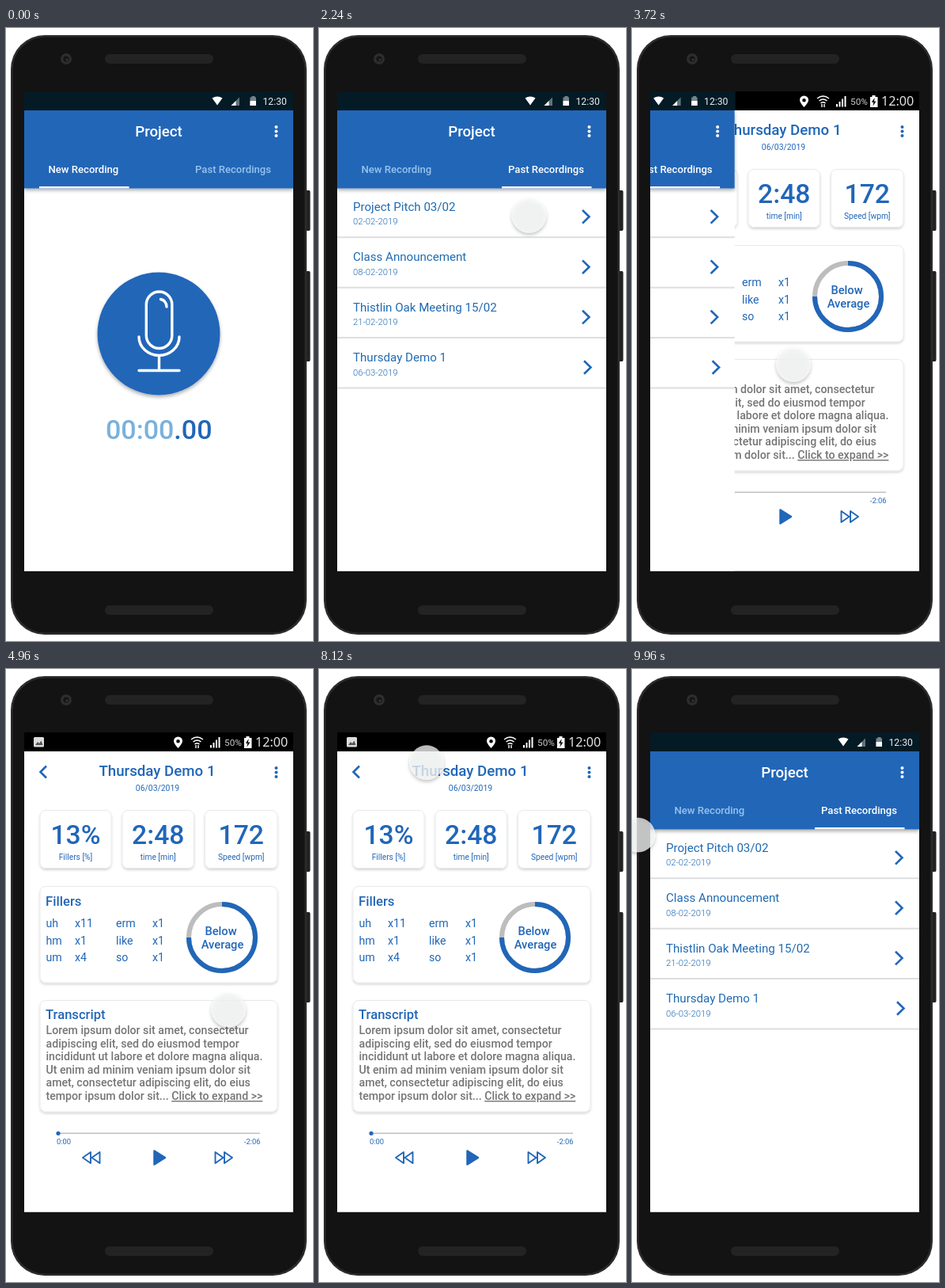
Write an HTML page that moves like this. It is 388 by 774 pixels and loops after 10 s.

```html
<!DOCTYPE html>
<html lang="en">
<head>
<meta charset="utf-8">
<title>Recorder prototype</title>
<style>
  html, body { margin: 0; width: 100%; height: 100%; overflow: hidden; background: #fff; }
  svg { display: block; width: 100%; height: 100%; font-family: Roboto, sans-serif; }
  .blue { fill: #2166b8; }
  .line { fill: none; stroke: #2166b8; stroke-width: 2.6; }
  .mic { fill: none; stroke: #fff; stroke-width: 3.4; stroke-linecap: round; }
  .med { font-weight: 500; }
  .mid { text-anchor: middle; }
  .end { text-anchor: end; }
  .card { fill: #fff; stroke: #e6eaed; filter: url(#soft); }
</style>
</head>
<body>
<svg viewBox="0 0 388 774">
  <defs>
    <clipPath id="glass"><rect x="23" y="80" width="340" height="605.5"/></clipPath>
    <filter id="soft" x="-10%" y="-10%" width="120%" height="130%">
      <feDropShadow dx="0" dy="2" stdDeviation="1.8" flood-opacity=".16"/>
    </filter>
    <filter id="deep" x="-20%" y="-20%" width="140%" height="150%">
      <feDropShadow dx="0" dy="2.5" stdDeviation="2" flood-opacity=".32"/>
    </filter>
  </defs>

  <g id="phone">
    <path d="M378 205h5q1.500 0 1.500 2v47q0 2 -1.500 2h-5zM378 307h5q1.500 0 1.500 2v110q0 2 -1.500 2h-5z" fill="#222"/>
    <rect x="6" y="9" width="374" height="757" rx="43" fill="#2c2c2c"/>
    <rect x="8.500" y="11.500" width="369" height="752" rx="41" fill="#131313"/>
    <circle cx="76" cy="39" r="7" fill="#2d2d2d"/>
    <circle cx="76" cy="39" r="3.600" fill="#161616"/>
    <circle cx="77" cy="40" r="1.300" fill="#3a3a3a"/>
    <rect x="125" y="33" width="137" height="12" rx="6" fill="#232323"/>
    <rect x="125" y="729" width="137" height="12" rx="6" fill="#232323"/>
    <rect x="23" y="80" width="340" height="605.500" fill="#fff"/>
  </g>

  <g id="screen" clip-path="url(#glass)">
    <g id="home">
      <rect x="23" y="80" width="340" height="606" fill="#fff"/>
      <g id="recorder">
        <circle class="blue" cx="193" cy="386" r="77.500" filter="url(#deep)"/>
        <g class="mic">
          <rect x="177.300" y="333" width="32.500" height="71.500" rx="16.200"/>
          <path d="M195.500 342.500q7 1.500 7.500 9.500M168 390a25.500 23.500 0 0 0 51 0M193.500 414v18M168 432.500h51"/>
        </g>
        <text class="med" x="126" y="519" font-size="34" fill="#7ab1dc">00:00<tspan class="blue">.00</tspan></text>
      </g>
      <g id="list"></g>
      <rect x="23" y="104" width="340" height="98.500" class="blue" filter="url(#deep)"/>
      <rect x="22" y="80" width="342" height="24" fill="#041a25"/>
      <path d="M260.500 88.500q6.500-4 13 0l-6.500 9z" fill="#fff"/>
      <path d="M284.500 98h10.500v-10.500z" fill="#61727b"/>
      <path d="M284.500 98h6v-6z" fill="#fff"/>
      <path d="M310.500 86h4v1.500h1.500v10.500h-7.500v-10.500h2z" fill="#75838a"/>
      <path d="M308.500 92h7.500v6h-7.500z" fill="#fff"/>
      <text x="324.500" y="97" font-size="12.200" fill="#e8edef">12:30</text>
      <text class="med mid" x="193" y="136.500" font-size="18.700" fill="#fff">Project</text>
      <g fill="#fff"><circle cx="341.500" cy="125" r="2"/><circle cx="341.500" cy="130.500" r="2"/><circle cx="341.500" cy="136" r="2"/></g>
      <text id="tabNew" class="med" x="53.500" y="183" font-size="13.100">New Recording</text>
      <text id="tabPast" class="med" x="239" y="183" font-size="13.100">Past Recordings</text>
      <rect id="marker" x="42" y="200" width="113.500" height="2.500" fill="#fff"/>
    </g>

    <g id="detail">
      <rect x="23" y="80" width="340" height="606" fill="#fff"/>
      <rect x="22" y="80" width="342" height="24"/>
      <g fill="#fff">
        <rect x="35" y="86" width="13" height="12.500" rx="1.500" fill="#ddd"/>
        <path d="M37 96l3-4 2 2 2.500-3.500 2 5.500z" fill="#555"/>
        <path fill-rule="evenodd" d="M217.500 100q-5.500-6-5.500-9a5.500 5.500 0 0 1 11 0q0 3-5.500 9zM217.500 93.500a2.300 2.300 0 1 0 0-4.600 2.300 2.300 0 0 0 0 4.600z"/>
        <path d="M234 89q7.500-6 15 0M236.500 92q5-4 10 0M238.500 95q3-2.500 6 0M240 96v4M243 96v4" fill="none" stroke="#fff" stroke-width="1.400"/>
        <path d="M258 96h2v3.500h-2zM261.500 93h2v6.500h-2zM265 89.500h2v10h-2zM268.500 86h2v13.500h-2z"/>
        <path d="M303.500 85h4v2h3v13h-9.500v-13h2.500z"/>
        <path d="M306.800 88l-4 5.800h2.500l-.8 4.700 4-6h-2.600z" fill="#000"/>
        <text x="276" y="97" font-size="11.800" fill="#c8c8c8">50%</text>
        <text x="315" y="98" font-size="16.200" fill="#e2e2e2" style="font-family:'Noto Sans',sans-serif">12:00</text>
      </g>
      <path class="line" d="M51 122.500l-7.500 7.500 7.500 7.500"/>
      <g class="blue">
        <circle cx="341.500" cy="125" r="2"/><circle cx="341.500" cy="130.500" r="2"/><circle cx="341.500" cy="136" r="2"/>
        <text class="med mid" x="191" y="135" font-size="18.700">Thursday Demo 1</text>
        <text class="mid" x="191.500" y="154" font-size="10.400">06/03/2019</text>
      </g>
      <g id="stats"></g>
      <rect class="card" x="43" y="274.500" width="300" height="121.500" rx="7"/>
      <g id="fillers" class="blue">
        <text class="med" x="50" y="298.500" font-size="16.700">Fillers</text>
      </g>
      <circle cx="273" cy="339" r="42" fill="none" stroke="#bdbdbd" stroke-width="6"/>
      <path class="line" d="M273 297a42 42 0 1 1-42 42" style="stroke-width:6"/>
      <g class="blue med mid" font-size="14.700">
        <text x="271.500" y="336">Below</text><text x="273.500" y="353">Average</text>
      </g>
      <rect class="card" x="43" y="418.500" width="300" height="140.500" rx="7"/>
      <text class="blue med" x="50" y="442" font-size="16.600">Transcript</text>
      <g id="script" class="med" font-size="14.130" fill="#757575"></g>
      <path d="M64 586.300h257" stroke="#bcc0c4" stroke-width="1.400"/>
      <g class="blue">
        <circle cx="66" cy="586.300" r="2.600"/>
        <text x="64" y="600" font-size="9.400">0:00</text>
        <text class="end" x="321.500" y="600" font-size="9.400">-2:06</text>
        <path d="M187.500 608.500l13.500 8.500-13.500 8.500z" stroke="#2166b8" stroke-width="2.500" stroke-linejoin="round"/>
      </g>
      <path class="line" stroke-linejoin="round" style="stroke-width:1.900" d="M107 610v14l-10-7zM118.500 610v14l-10-7zM264.500 610v14l10-7zM276 610v14l10-7z"/>
    </g>
  </g>

  <g id="touch" filter="url(#deep)">
    <circle r="21.500" fill="#f6f7f7" fill-opacity=".74" stroke="#fff" stroke-opacity=".35"/>
  </g>
</svg>

<script>
const $ = id => document.getElementById(id);
const add = (id, html) => $(id).insertAdjacentHTML('beforeend', html);

const recordings = [
  ['Project Pitch 03/02', '02-02-2019'],
  ['Class Announcement', '08-02-2019'],
  ['Thistlin Oak Meeting 15/02', '21-02-2019'],
  ['Thursday Demo 1', '06-03-2019']
];
recordings.forEach(([name, date], i) => {
  const y = 231 + i * 63.4, x = i === 3 ? 335 : 333;
  add('list', `<g fill="#1f6ab2">
    <text x="43" y="${y}" font-size="15.1">${name}</text>
    <text x="43" y="${y + 17.3}" font-size="11.3" font-weight="300">${date}</text></g>
    <path class="line" d="M${x} ${y - 1}l8.500 8.300-8.500 8.300"/>
    <path d="M23 ${y + 33.3}h340" stroke="#dcdee0" stroke-width="2"/>`);
});

[[43, 90, '13%', 'Fillers [%]'], [147, 90.5, '2:48', 'time [min]'], [251.5, 91.5, '172', 'Speed [wpm]']]
  .forEach(([x, w, value, label]) => add('stats',
    `<rect class="card" x="${x}" y="178.500" width="${w}" height="73" rx="7"/>
     <g class="blue mid"><text class="med" x="${x + w / 2}" y="221" font-size="33.700">${value}</text>
     <text x="${x + w / 2}" y="241" font-size="10.200">${label}</text></g>`));

[['uh', 'x11', 'erm', 'x1'], ['hm', 'x1', 'like', 'x1'], ['um', 'x4', 'so', 'x1']]
  .forEach((row, i) => row.forEach((word, j) => add('fillers',
    `<text x="${[50.5, 87, 139, 185][j]}" y="${326 + i * 21.7}" font-size="14.200">${word}</text>`)));

['Lorem ipsum dolor sit amet, consectetur', 'adipiscing elit, sed do eiusmod tempor',
  'incididunt ut labore et dolore magna aliqua.', 'Ut enim ad minim veniam ipsum dolor sit',
  'amet, consectetur adipiscing elit, do eius',
  'tempor ipsum dolor sit... <tspan text-decoration="underline">Click to expand &gt;&gt;</tspan>']
  .forEach((text, i) => add('script', `<text x="50.500" y="${461 + i * 16.6}">${text}</text>`));

const LOOP = 10000, SOFT = 0.58, SHARP = 0.2;
const clamp = v => Math.min(1, Math.max(0, v));
const mix = (a, b, k) => a + (b - a) * k;

// Ease-out: cubic-bezier(0, 0, c, 1)
function ease(t, start, span, c) {
  const p = clamp((t - start) / span);
  let lo = 0, hi = 1;
  for (let i = 0; i < 24; i++) {
    const s = (lo + hi) / 2;
    if (3 * c * s * s * (1 - s) + s ** 3 < p) lo = s; else hi = s;
  }
  return p === 1 ? 1 : lo * lo * (3 - 2 * lo);
}

// Finger moves: start time, target x, target y, easing
const moves = [
  [25, 283, 183, SOFT],
  [2100, 204, 425, SOFT],
  [4420, 293, 431, SHARP],
  [5460, 370, 327, SOFT],
  [6500, 363, 121, SOFT],
  [7580, 51, 117, SOFT],
  [9820, -144, 533, SOFT]
];

const tabColor = k => `rgb(${mix(150, 255, k)},${mix(196, 255, k)},${mix(236, 255, k)})`;

function draw(t) {
  const tab = ease(t, 1058, 600, SOFT);
  $('marker').setAttribute('x', mix(42, 231, tab));
  $('tabNew').setAttribute('fill', tabColor(1 - tab));
  $('tabPast').setAttribute('fill', tabColor(tab));
  $('recorder').setAttribute('opacity', (1 - tab) ** 0.8);
  $('list').setAttribute('opacity', tab);

  const back = t > 8600;
  const top = $(back ? 'detail' : 'home');
  if ($('screen').lastElementChild !== top) $('screen').append(top);
  const homeX = back ? 0 : -342 * ease(t, 3390, 1000, SHARP);
  const detailX = back ? 342 * ease(t, 8630, 1000, SHARP) : 0;
  $('home').setAttribute('transform', `translate(${homeX})`);
  $('detail').setAttribute('transform', `translate(${detailX})`);

  let x = 416, y = 480;
  for (const [start, tx, ty, c] of moves) {
    const k = ease(t, start, 1000, c);
    x = mix(x, tx, k);
    y = mix(y, ty, k);
  }
  $('touch').setAttribute('transform', `translate(${x} ${y})`);
  $('touch').setAttribute('visibility', t < 30 ? 'hidden' : 'visible');
}

const begin = performance.now();
function tick(now) {
  draw(Math.max(0, now - begin) % LOOP);
  requestAnimationFrame(tick);
}
draw(0);
requestAnimationFrame(tick);
</script>
</body>
</html>
```
